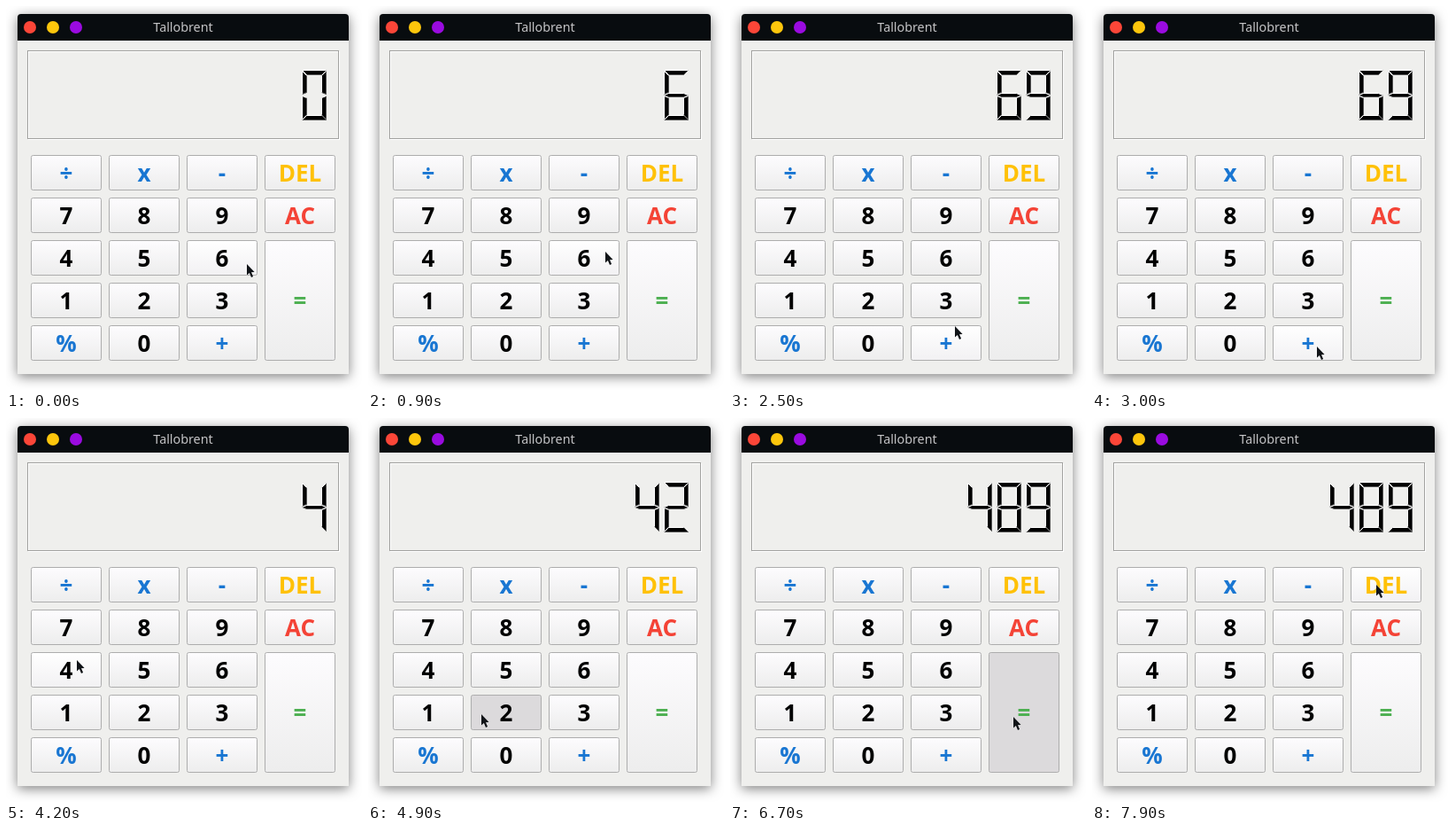
Recreate the animation shown at these times as an HTML page. Size 402x433 px, loop 8 s.

```html
<!DOCTYPE html>
<html lang="en">
<head>
<meta charset="utf-8">
<title>Calculator</title>
<style>
  html, body { margin: 0; width: 100%; height: 100%; overflow: hidden; background: #fff; }
  .win {
    position: absolute; left: 13px; top: 9px; width: 374px; height: 406px;
    border-radius: 4px 4px 0 0;
    background: linear-gradient(#080c0f 30px, #efefed 30px);
    box-shadow: 0 3px 14px rgba(0, 0, 0, .5);
  }
  svg { position: absolute; left: 0; top: 0; }
  text { text-anchor: middle; font-family: "Noto Sans", "Open Sans", sans-serif; }
  .title { font-size: 14.3px; fill: #c4c4c6; }
  .key text { font-size: 26px; font-weight: 600; }
  .key rect { fill: url(#up); stroke: #adadad; }
  .key.hover rect { fill: url(#hover); }
  .key.down rect { fill: #dcdadc; }
  .frame { fill: none; stroke: #a2a2a0; }
  .frame.lit { stroke: #fff; }
  .lit-edge { fill: none; stroke: #fff; }
  .dark-edge { fill: none; stroke: #555; }
</style>
</head>
<body>
<div class="win"></div>
<svg width="402" height="433" viewBox="0 0 402 433">
  <defs>
    <linearGradient id="up" x2="0" y2="1">
      <stop stop-color="#fdfcfe"/><stop offset="1" stop-color="#ededed"/>
    </linearGradient>
    <linearGradient id="hover" x2="0" y2="1">
      <stop stop-color="#fff"/><stop offset="1" stop-color="#f2f1f3"/>
    </linearGradient>
  </defs>
  <circle cx="27" cy="24" r="7" fill="#fb4638"/>
  <circle cx="53" cy="24" r="7" fill="#fdc60c"/>
  <circle cx="79" cy="24" r="7" fill="#9a0be0"/>
  <text class="title" x="200" y="29">Tallobrent</text>
  <rect class="frame lit" x="25.5" y="51.5" width="351" height="99"/>
  <rect class="frame" x="24.5" y="50.5" width="351" height="99"/>
  <g id="lcd"></g>
  <g id="keys"></g>
  <path id="cursor" d="M0 0V12.6L2.9 10L5 15L7.1 14.1L5 9.3L8.6 9Z"
        fill="#111418" stroke="#fff" stroke-opacity=".6" stroke-width=".7" paint-order="stroke"/>
</svg>
<script>
const LOOP = 8000, STEP = 100;
const BLUE = '#1976d2', YELLOW = '#ffc107', RED = '#f44336', GREEN = '#4caf50';
const $ = id => document.getElementById(id);

function add(parent, tag, attrs, label = '') {
  const el = document.createElementNS('http://www.w3.org/2000/svg', tag);
  for (const name in attrs) el.setAttribute(name, attrs[name]);
  el.textContent = label;
  return parent.appendChild(el);
}

// Keypad
const rows = [['÷', 'x', '-', 'DEL'], ['7', '8', '9', 'AC'], ['4', '5', '6', '='],
              ['1', '2', '3'], ['%', '0', '+']];
const tints = { DEL: YELLOW, AC: RED, '=': GREEN };
const keys = rows.flatMap((row, r) => row.map((label, c) => {
  const x = 28 + 88 * c, y = 168 + 48 * r, h = label === '=' ? 136 : 40;
  const el = add($('keys'), 'g', { class: 'key' });
  add(el, 'rect', { x: x + .5, y: y + .5, width: 79, height: h - 1, rx: 2 });
  const fill = tints[label] || (/\d/.test(label) ? '#000' : BLUE);
  add(el, 'text', { x: x + 40, y: y + h / 2 + 9.5, fill }, label);
  return { label, x, y, h, el };
}));

// Seven-segment digits: each segment has a bevel, lit edges first
const L = 28, W = 5, R = L - 1;
const segments = [
  { lit: [[W, W], [0, 0], [R, 0]], dark: [[R, 0], [R - W, W], [W, W]] },
  { lit: [[0, L - 1], [0, 1], [W, W + 1]], dark: [[W, W + 1], [W, L - 3], [0, L - 1]] },
  { lit: [[R - W, L - 3], [R - W, W + 1], [R, 1]], dark: [[R, 1], [R, L - 1], [R - W, L - 3]] },
  { lit: [[0, L], [W, L - 2], [R - W, L - 2], [R, L]], dark: [[R, L], [R - W, L + 2], [W, L + 2], [0, L]] },
  { lit: [[0, 2 * L - 1], [0, L + 1], [W, L + 3]], dark: [[W, L + 3], [W, 2 * L - W - 1], [0, 2 * L - 1]] },
  { lit: [[R - W, 2 * L - W - 1], [R - W, L + 3], [R, L + 1]], dark: [[R, L + 1], [R, 2 * L - 1], [R - W, 2 * L - W - 1]] },
  { lit: [[0, 2 * L], [W, 2 * L - W], [R - W, 2 * L - W]], dark: [[R - W, 2 * L - W], [R, 2 * L], [0, 2 * L]] }
];
const glyphs = { 0: '012456', 2: '02346', 4: '1235', 6: '013456', 8: '0123456', 9: '012356' };

function drawNumber(value) {
  $('lcd').replaceChildren();
  [...value].forEach((digit, i) => {
    const x = 334.5 - 33 * (value.length - 1 - i);
    const g = add($('lcd'), 'g', { transform: `translate(${x} 72.5)` });
    for (const n of glyphs[digit]) {
      const { lit, dark } = segments[n];
      add(g, 'path', { d: `M${[...lit, ...dark].join('L')}Z` });
      add(g, 'path', { class: 'dark-edge', d: 'M' + dark.join('L') });
      add(g, 'path', { class: 'lit-edge', d: 'M' + lit.join('L') });
    }
  });
}

// Timeline
const shown = [[0, '0'], [400, '6'], [1300, '69'], [4200, '4'], [4900, '42'], [5700, '420'], [6700, '489']];
const presses = [[400, '6'], [1300, '9'], [2800, '+'], [4900, '2'], [5700, '0'], [6700, '=']];
const home = [272, 291];
const moves = [ // first step, last step, destination
  [900, 1100, 256, 237], [2300, 2600, 254, 384], [3400, 3900, 80, 273], [4400, 4700, 128, 334],
  [5300, 5500, 162, 395], [6100, 6500, 320, 337], [7400, 7900, 321, 188]
];
const ease = p => p * p * (3 - 2 * p);

function cursorAt(t) {
  let [x, y] = home;
  for (const [from, to, tx, ty] of moves) {
    if (t < from) break;
    const p = ease(Math.min(1, (t - from + STEP) / (to - from + STEP)));
    x += (tx - x) * p;
    y += (ty - y) * p;
  }
  return [Math.round(x), Math.round(y)];
}

let lastTick = -1, lastValue;
function render(t) {
  const [cx, cy] = cursorAt(t);
  $('cursor').setAttribute('transform', `translate(${cx} ${cy})`);
  const value = shown.findLast(([at]) => at <= t)[1];
  if (value !== lastValue) drawNumber(lastValue = value);
  const press = presses.find(([at]) => t >= at && t < at + 200);
  for (const { label, x, y, h, el } of keys) {
    el.classList.toggle('down', !!press && press[1] === label);
    el.classList.toggle('hover', cx >= x && cx < x + 80 && cy >= y && cy < y + h);
  }
}

const start = performance.now();
function frame() {
  const tick = Math.floor((performance.now() - start) % LOOP / STEP) * STEP;
  if (tick !== lastTick) render(lastTick = tick);
  requestAnimationFrame(frame);
}
frame();
</script>
</body>
</html>
```
